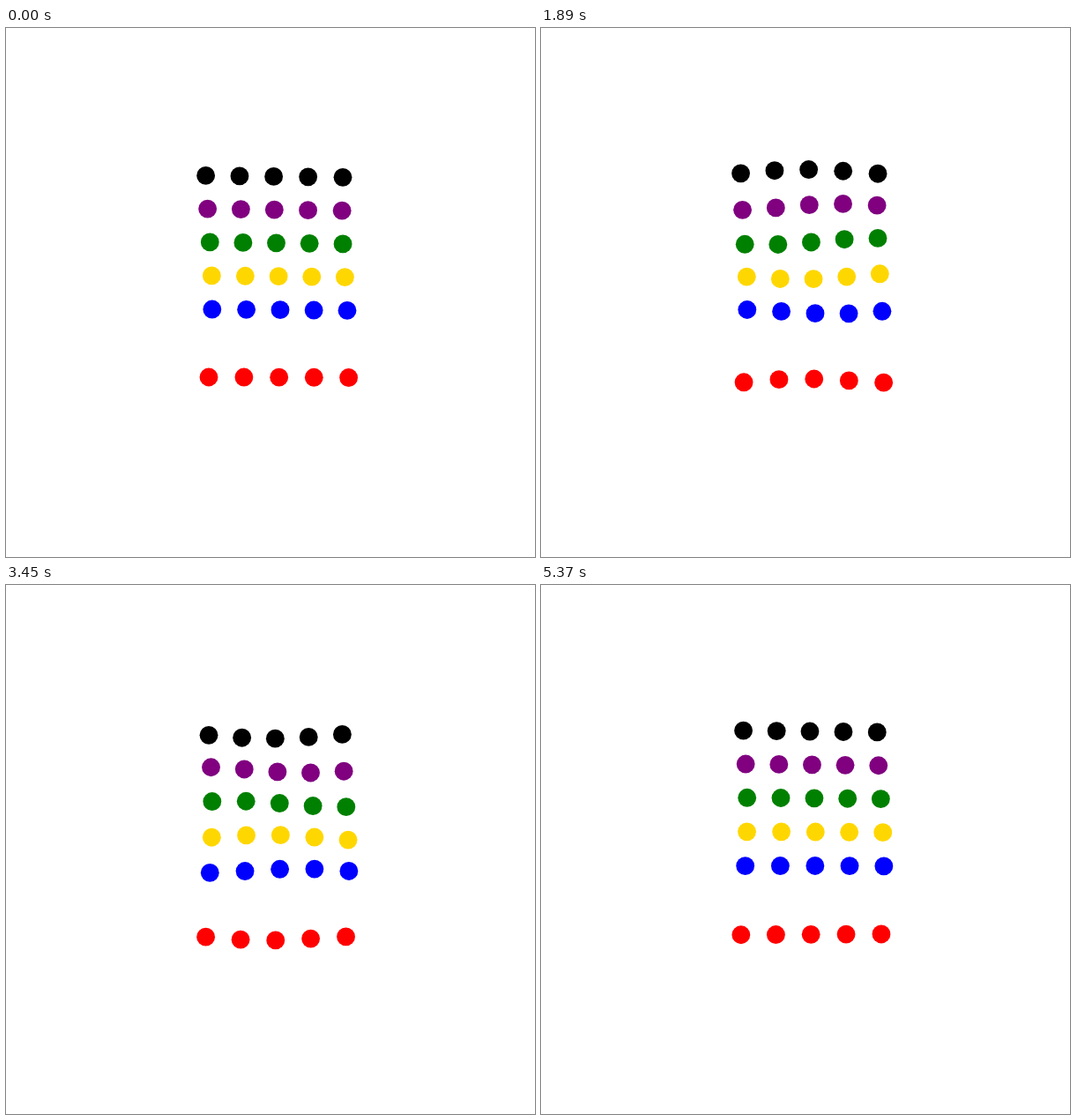
These frames come from a looping animation (600 by 600 pixels, 5.4 s). An HTML page with a canvas:

```html
<!DOCTYPE html>
<html lang="en">
<head>
<meta charset="utf-8">
<title>Waving dots</title>
<style>
html, body { margin: 0; width: 100%; height: 100%; overflow: hidden; background: #fff; }
canvas { display: block; width: 600px; height: 600px; }
</style>
</head>
<body>
<canvas id="stage" width="600" height="600"></canvas>
<script>
const ctx = document.getElementById('stage').getContext('2d');
const STEP = 30, STEPS = 180;
const GAP = 38.75, LEFT = 230, TOP = 167.375;
const RADIUS = 10.42, AMP = GAP / 10;
const COLS = 5;
// the sixth row stays empty
const ROWS = ['#000', '#800080', '#008000', '#ffd700', '#00f', null, '#f00'];

// two travelling waves plus one standing wave in y
function place(row, col, n) {
  const sway = Math.sin(0.7 * row - 0.3 * col - 0.1 * n - 1.06);
  const swell = Math.sin(Math.PI / 24 * (2 * row - col) - n / 15);
  const ripple = Math.sin(0.035 * n) * Math.cos(row - col + 1.85);
  return [
    LEFT + GAP * col + AMP * sway,
    TOP + GAP * row - AMP * (swell + ripple)
  ];
}

function draw(n) {
  ctx.fillStyle = '#fff';
  ctx.fillRect(0, 0, 600, 600);
  ROWS.forEach((color, row) => {
    if (!color) return;
    ctx.fillStyle = color;
    for (let col = 0; col < COLS; col++) {
      const [x, y] = place(row, col, n);
      ctx.beginPath();
      ctx.arc(x, y, RADIUS, 0, 2 * Math.PI);
      ctx.fill();
    }
  });
}

let start = null;
function tick(now) {
  if (start === null) start = now;
  draw(Math.floor(Math.max(0, now - start) / STEP) % STEPS);
  requestAnimationFrame(tick);
}
draw(0);
requestAnimationFrame(tick);
</script>
</body>
</html>
```
